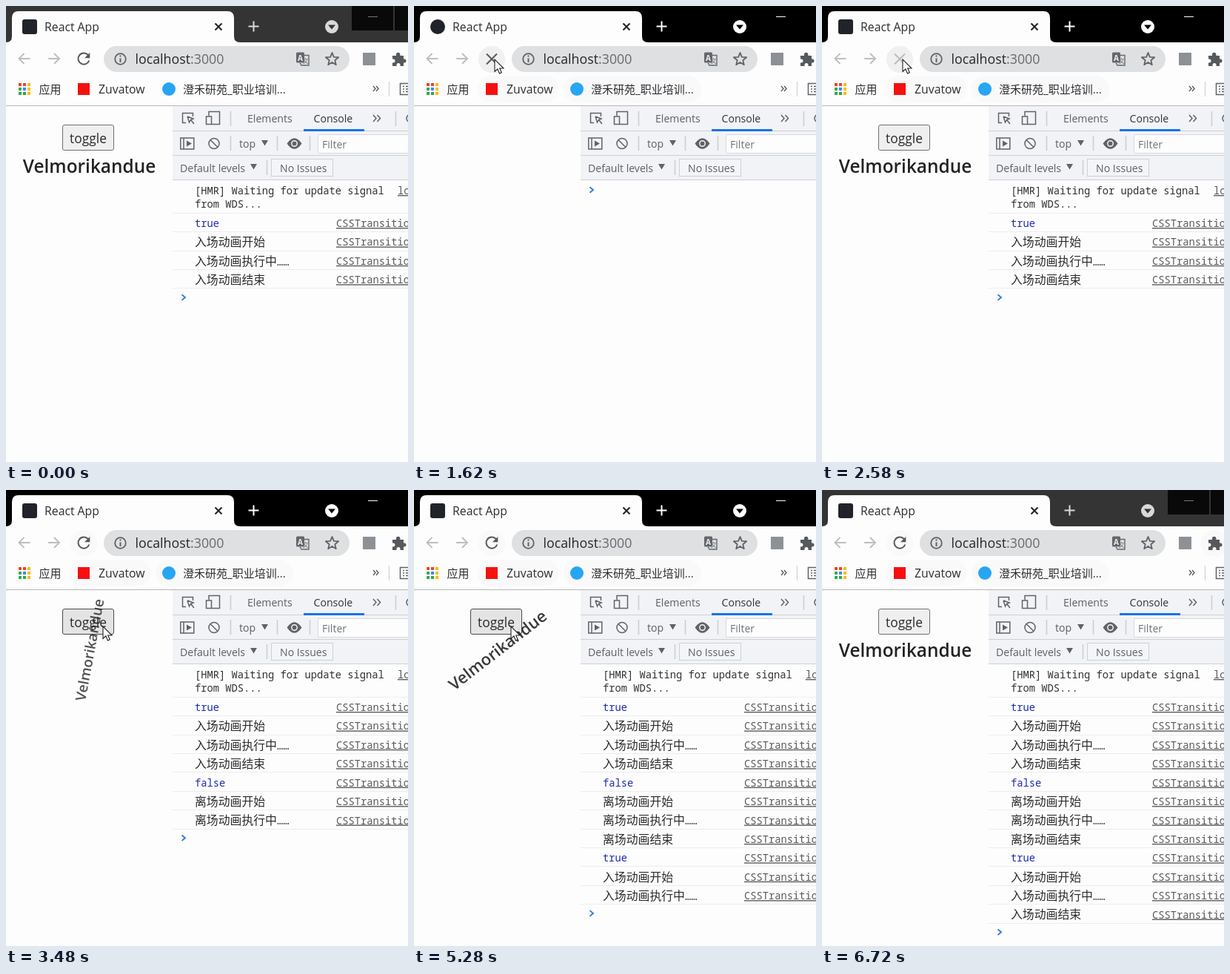
Animation of 543 by 615 pixels, one loop 6780 ms. Source, as an HTML page:

```html
<!DOCTYPE html>
<html lang="zh">
<head>
<meta charset="utf-8">
<title>React App</title>
<style>
html, body { margin: 0; width: 100%; height: 100%; overflow: hidden; background: #fdfdfd; }
svg { display: block; width: 543px; height: 615px; }
text { font-family: "Open Sans", "Noto Sans CJK SC", "Noto Sans CJK", sans-serif; white-space: pre; }
.mono { font: 13.75px "Noto Sans Mono", "Noto Sans CJK SC", "Noto Sans CJK", monospace; fill: #303030; }
.flag { fill: #1c2bae; }
.cjk { font: 300 15.85px "Noto Sans CJK SC", "Noto Sans CJK", sans-serif; fill: #2b2b2b; }
.link { fill: #5a5a5a; text-decoration: underline; }
.tool { font-size: 14.1px; fill: #5b5f64; }
.ico { fill: none; stroke: #5f6368; stroke-width: 1.8; }
.thin { stroke-width: 1.5; }
.sep { stroke: #cacdd1; }
</style>
</head>
<body>
<svg viewBox="0 0 543 615">
  <rect width="543" height="615" fill="#fdfdfd"/>

  <!-- title bar -->
  <rect id="bar" width="543" height="49"/>
  <path id="idle" d="M467 0H523V33H467ZM525 0H543V33H525Z" fill="#090909"/>
  <path id="dash" d="M489 14.5H502"/>
  <path d="M0 49Q8 49 8 41V16Q8 7 17 7H299Q308 7 308 16V41Q308 49 316 49Z" fill="#fdfdfd"/>
  <rect id="fav" x="22" y="18" width="20" height="20" fill="#20232a"/>
  <text x="52" y="34" font-size="15.8" fill="#2b2d30">React App</text>
  <path d="M282.5 23.5L291.5 32.5M291.5 23.5L282.5 32.5" stroke="#222" stroke-width="2"/>
  <path id="plus" d="M327.5 27.5H341.5M334.5 20.5V34.5" stroke-width="2"/>
  <circle id="disc" cx="440" cy="28" r="9"/>
  <path id="tri" d="M435 25.5H445L440 31.5Z"/>

  <!-- address row -->
  <g fill="none" stroke="#bcbec1" stroke-width="1.9">
    <path d="M32.5 71H17.5M24.5 64L17.5 71L24.5 78"/>
    <path d="M57 71H72M65 64L72 71L65 78"/>
  </g>
  <circle id="reloadHover" cx="105" cy="72" r="18" fill="#f0f0f1"/>
  <g id="reload">
    <path d="M110.8 66A7.6 7.6 0 1 0 112.3 73.5" fill="none" stroke="#54585c" stroke-width="2"/>
    <path d="M113.3 63V70.3H106Z" fill="#54585c"/>
  </g>
  <path id="stop" d="M98 64.5L112 78.5M112 64.5L98 78.5" stroke-width="2"/>
  <rect x="132" y="54" width="332" height="35" rx="17.5" fill="#dfe0e1"/>
  <circle class="ico" cx="154.5" cy="71.5" r="7.3"/>
  <path d="M154.5 70.5V76M154.5 66.6V68.6" stroke="#5f6368" stroke-width="2"/>
  <text x="174.5" y="78" font-size="17.8" fill="#25272a">localhost<tspan fill="#666a6f">:3000</tspan></text>
  <rect x="392" y="62.5" width="11" height="14" rx="1.5" fill="#64686d"/>
  <path d="M403 66.5H409V80H399L397 76.5" fill="none" stroke="#64686d" stroke-width="1.4"/>
  <text x="394" y="73.5" font-size="10" font-weight="700" fill="#eee">A</text>
  <text x="400.8" y="77" font-size="8" fill="#64686d">文</text>
  <path id="star" class="ico" stroke-linejoin="round"/>
  <rect x="482" y="63" width="17" height="17" fill="#8d9195"/>
  <circle id="extHover" cx="530" cy="72" r="18" fill="#f0f0f1"/>
  <path d="M522 67H527V65.5A2.7 2.7 0 0 1 532.4 65.5V67H537V71.5H538A2.5 2.5 0 0 1 538 76.5H537V81H532.5V79.5A2.5 2.5 0 0 0 527.5 79.5V81H522V76.5H523A2.5 2.5 0 0 0 523 71.5H522Z" fill="#55595d"/>

  <!-- bookmarks -->
  <rect id="pillA" x="86" y="94" width="109" height="36" rx="18" fill="#f1f1f2"/>
  <rect id="pillB" x="202" y="94" width="186" height="36" rx="18" fill="#f1f1f2"/>
  <g id="apps"></g>
  <text x="44.5" y="118" font-size="15" fill="#2b2d30">应用</text>
  <rect x="97" y="104" width="16" height="16" fill="#f5100f"/>
  <text x="125" y="118" font-size="15.8" fill="#2b2d30">Zuvatow</text>
  <circle cx="220" cy="112" r="9" fill="#27a5f3"/>
  <text x="239" y="118" font-size="15" fill="#2b2d30">澄禾研苑_职业培训...</text>
  <path d="M496 108L499 111.5L496 115M500 108L503 111.5L500 115" class="ico thin"/>
  <path d="M517.5 102V122" class="sep"/>
  <path d="M545 104.5H532.5V119.5H545M536 108.5H538M540 108.5H545M536 112H538M540 112H545M536 115.5H538M540 115.5H545" class="ico thin"/>
  <path d="M0 134.5H543" stroke="#b5b7ba"/>

  <!-- page -->
  <g id="button">
    <rect id="face" x="76.5" y="160.5" width="69" height="34" rx="2.5"/>
    <text x="111" y="185" font-size="17.4" text-anchor="middle" fill="#2a2a2a">toggle</text>
  </g>
  <g id="word"><text y="9.5" font-size="24.4" font-weight="600" text-anchor="middle" fill="#222">Velmorikandue</text></g>

  <!-- developer tools -->
  <rect x="225" y="135" width="318" height="480" fill="#fdfdfd"/>
  <rect x="225" y="135" width="318" height="99" fill="#f1f3f6"/>
  <path d="M225 168.5H543M225 201.5H543M225 234.5H543" stroke="#cdd0d5"/>
  <path d="M303.5 142V162M526.5 142V162M303.5 175V195M366.5 175V195M410.5 175V195M352.5 208V228" class="sep thin"/>
  <g class="ico thin">
    <path d="M243 157.5H238.5V144.5H252.5V149M245 149L247.5 157L249.5 153.5L254 159M245 149L253 152L249.5 153.5"/>
    <path d="M274 148V142.5H288.5V159.5H278"/>
    <rect x="270.5" y="149" width="7" height="10.5"/>
    <path d="M496 147L500 151.5L496 156M501.5 147L505.5 151.5L501.5 156"/>
    <circle cx="546" cy="151.5" r="5"/>
    <rect x="235.8" y="178" width="18" height="15"/>
    <path d="M240 178V193"/>
    <circle cx="281" cy="185.5" r="7"/>
    <path d="M276 180.5L286 190.5"/>
    <path d="M380.5 185.5Q389.5 172.5 398.5 185.5Q389.5 198.5 380.5 185.5Z" fill="#5f6368"/>
    <circle cx="389.5" cy="185.5" r="3.7" stroke="#f1f3f6"/>
  </g>
  <path d="M244 181.5L251 185.5L244 189.5ZM345 181H354L349.5 188.5ZM330 213H339L334.5 220.5Z" fill="#5f6368"/>
  <text class="tool" x="326" y="157">Elements</text>
  <text class="tool" x="415.5" y="157" style="fill:#303337">Console</text>
  <rect x="402" y="166" width="82" height="3" fill="#1a73e8"/>
  <text class="tool" x="315" y="190.5">top</text>
  <path d="M545 173.5H421.5V198.5H545" fill="#fdfdfd" stroke="#d6d9dd"/>
  <text class="tool" x="427" y="191.5" style="fill:#717479">Filter</text>
  <text class="tool" x="235" y="223.5">Default levels</text>
  <rect x="358.5" y="206.5" width="83" height="23" fill="#f3f5f8" stroke="#cdd0d5"/>
  <text class="tool" x="370" y="223.5">No Issues</text>
  <g id="hmr">
    <text class="mono" x="255" y="254">[HMR] Waiting for update signal</text>
    <text class="mono" x="255" y="272">from WDS...</text>
    <text class="mono link" x="529" y="254">log.js</text>
    <path d="M225 279.5H543" stroke="#ebedf0"/>
  </g>
  <g id="rows"></g>
  <path id="prompt" d="M-2.5 -3.8L2 0L-2.5 3.8" fill="none" stroke="#2f7de9" stroke-width="1.9"/>
  <path id="caret" d="M255.5 384V402" stroke="#222"/>

  <path id="cursor" d="M0 0V16.5L3.9 13L6.5 19L9.3 17.8L6.7 12H12Z" fill="#fff" stroke="#222" stroke-width="1.1"/>
</svg>
<script>
const LOOP = 6780, STEP = 60, FADE = 780, PITCH = 25.42;
const $ = id => document.getElementById(id);
const set = (id, attrs) => { for (const k in attrs) $(id).setAttribute(k, attrs[k]); };
const show = (id, on) => set(id, { visibility: on ? "visible" : "hidden" });
const within = (t, a, b) => t >= a && t < b;

// Static repeated parts
const starPoints = Array.from({ length: 10 }, (_, i) => {
  const a = i * Math.PI / 5 - Math.PI / 2, r = i % 2 ? 4 : 9;
  return (440.5 + r * Math.cos(a)).toFixed(1) + " " + (72 + r * Math.sin(a)).toFixed(1);
});
set("star", { d: "M" + starPoints.join("L") + "Z" });

const appColors = ["#ea4335", "#ea4335", "#fbbc05", "#34a853", "#4285f4", "#fbbc05", "#34a853", "#34a853", "#fbbc05"];
$("apps").innerHTML = appColors.map((c, i) =>
  `<rect x="${17 + i % 3 * 6}" y="${104 + (i / 3 | 0) * 6}" width="4" height="4" fill="${c}"/>`).join("");

const phase = (flag, kind) => [flag, kind + "场动画开始", kind + "场动画执行中……", kind + "场动画结束"];
const lines = [...phase("true", "入"), ...phase("false", "离"), ...phase("true", "入")];

function rowMarkup(line, i) {
  const y = 293 + PITCH * i;
  const body = line.replace("……", '<tspan class="mono">……</tspan>');
  const text = i % 4
    ? `<text class="cjk" x="255" y="${y + 5.8}">${body}</text>`
    : `<text class="mono flag" x="255" y="${y + 5}">${body}</text>`;
  return `<g>${text}<text class="mono link" x="446" y="${y + 5}">CSSTransition</text>` +
    `<path d="M225 ${Math.round(y + 11.1) + 0.5}H543" stroke="#ebedf0"/></g>`;
}
$("rows").innerHTML = lines.map(rowMarkup).join("");
const rows = [...$("rows").children];

// cubic-bezier(.25, .1, .25, 1)
function ease(x) {
  if (x <= 0) return 0;
  if (x >= 1) return 1;
  const curve = (s, a, b) => 3 * s * (1 - s) ** 2 * a + 3 * s * s * (1 - s) * b + s ** 3;
  let lo = 0, hi = 1;
  for (let i = 0; i < 24; i++) {
    const mid = (lo + hi) / 2;
    if (curve(mid, .25, .25) < x) lo = mid; else hi = mid;
  }
  return curve(lo, .1, 1);
}

// Pointer path: time, x, y
const path = [
  [240, 452, 100], [360, 350, 104], [540, 190, 104], [720, 118, 80], [840, 109, 72],
  [2580, 109, 72], [2820, 116, 118], [3060, 131, 184],
  [6120, 131, 184], [6240, 250, 143], [6360, 520, 66], [6420, 545, 63]
];
function pointer(t) {
  if (t < path[0][0] || t >= 6420) return null;
  const i = path.findIndex(p => p[0] > t);
  const [a, b] = [path[i - 1], path[i]];
  const k = (t - a[0]) / (b[0] - a[0]);
  return [a[1] + (b[1] - a[1]) * k, a[2] + (b[2] - a[2]) * k];
}

// Row count after each moment; -1 means an empty console
const counts = [[0, 4], [1440, -1], [1680, 0], [1800, 3], [2580, 4], [3300, 7], [4140, 8], [4800, 11], [5580, 12]];
const rowCount = t => counts.filter(c => c[0] <= t).pop()[1];

function wordScale(t) {
  if (t < 1440) return 1;
  if (t < 3350) return ease((t - 1800) / FADE);
  if (t < 4800) return 1 - ease((t - 3350) / FADE);
  return ease((t - 4800) / FADE);
}

function draw(t) {
  const active = within(t, 1140, 6660);
  const light = active ? "#fff" : "#d9d9d9", dark = active ? "#000" : "#343434";
  set("bar", { fill: dark });
  show("idle", !active);
  set("dash", { stroke: active ? "#fff" : "#777" });
  set("plus", { stroke: light });
  set("disc", { fill: light });
  set("tri", { fill: dark });
  set("fav", { rx: within(t, 1380, 2460) ? 10 : 3 });

  const pos = pointer(t);
  const over = (x, y, w, h) => !!pos && within(pos[0], x, x + w) && within(pos[1], y, y + h);
  // A highlight keeps a faint tint once the pointer has left
  const halo = (id, hit, left) => set(id, { opacity: hit ? 1 : t >= left ? 0.35 : 0 });
  show("cursor", pos);
  if (pos) set("cursor", { transform: `translate(${pos[0]} ${pos[1]})` });
  halo("pillB", over(202, 94, 186, 36), 540);
  halo("pillA", over(86, 94, 109, 36), 660);
  halo("reloadHover", over(87, 54, 36, 36), 2640);
  halo("extHover", over(512, 54, 36, 36), 6420);

  const stopping = within(t, 1320, 2640);
  show("reload", !stopping);
  show("stop", stopping);
  set("stop", { stroke: t < 1800 ? "#54585c" : "#b9bbbd" });

  const pressed = within(t, 3300, 3360) || within(t, 4800, 4860);
  const hover = over(76, 160, 70, 35);
  set("face", {
    fill: pressed ? "#f5f5f5" : hover ? "#e4e4e4" : "#efefef",
    stroke: pressed ? "#777" : hover ? "#4b4b4b" : "#707070"
  });
  show("button", !within(t, 1440, 1680));

  const p = wordScale(t);
  show("word", p > 0.004);
  set("word", { opacity: p, transform: `translate(112.5 215.5) rotate(${360 * p}) scale(${p})` });

  const n = rowCount(t);
  show("hmr", n >= 0);
  rows.forEach((row, i) => row.setAttribute("visibility", i < n ? "visible" : "hidden"));
  set("prompt", { transform: `translate(240 ${n < 0 ? 248 : 291.3 + PITCH * n})` });
  show("caret", within(t, 1140, 1320));
}

const start = performance.now();
function tick() {
  const t = (performance.now() - start) % LOOP;
  draw(Math.floor(t / STEP) * STEP);
  requestAnimationFrame(tick);
}
draw(0);
requestAnimationFrame(tick);
</script>
</body>
</html>
```
